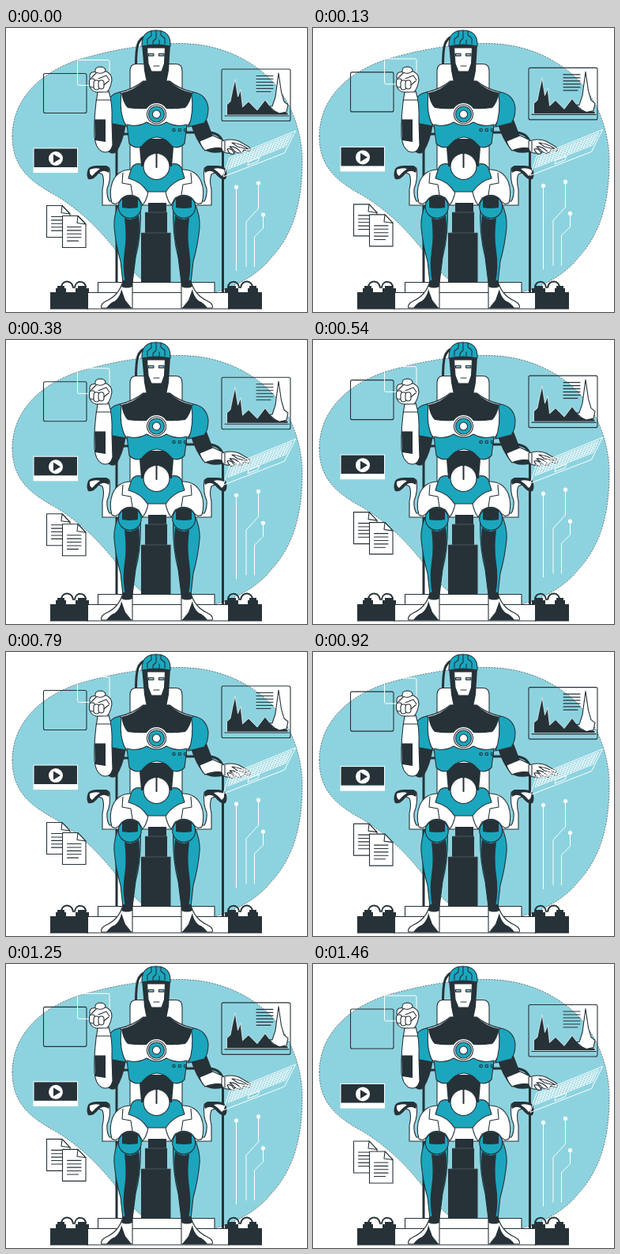
These frames come from a looping animation (381x359 px, 1500 ms). An HTML page:

```html
<!DOCTYPE html>
<html lang="en">
<head>
<meta charset="utf-8">
<title>Robot at work</title>
<style>
html,body{margin:0;width:100%;height:100%;overflow:hidden;background:#fff}
svg{display:block;width:381px;height:359px}
.d{fill:#263238}
.t{fill:#1ba6be}
.w{fill:#fff}
.o{stroke:#263238;stroke-width:1.1;stroke-linejoin:round;stroke-linecap:round}
.l{fill:none;stroke:#263238;stroke-width:1.1;stroke-linecap:round;stroke-linejoin:round}
.r{fill:none;stroke:#263238;stroke-width:3}
.h{fill:none;stroke:#fff;stroke-width:1}
</style>
</head>
<body>
<svg viewBox="0 0 381 359">
  <path fill="#8dd3df" stroke="#263238" stroke-width=".6" stroke-dasharray="2 1.5" d="M8 137C8 94 38 58 92 40C136 27 180 19.500 222 19.500C262 20 297 33 325 56C358 83 375 128 375 168C375 215 366 258 336 290C318 313 290 327 264 334H200C170 324 152 298 136 277C112 248 90 228 62 211C26 192 8 172 8 137Z"/>

  <g class="bob">
    <rect class="l" x="47.500" y="57.500" width="54.500" height="50" rx="2"/>
    <rect class="h" x="90.500" y="40.500" width="40.500" height="32" rx="2"/>
    <rect class="w" x="34.500" y="151.500" width="56.500" height="31.500"/>
    <rect class="d" x="35.500" y="152.500" width="54.500" height="23.500"/>
    <circle class="w" cx="63" cy="165" r="9"/>
    <path class="d" d="M60 159.500L69 165L60 170.500Z"/>
    <g id="docs"></g>
    <g id="chart">
      <rect class="l" x="273" y="52" width="87" height="65.500" rx="2"/>
      <path id="text" class="l"/>
      <path class="d" stroke="#fff" stroke-width=".7" d="M279.500 110V97L284 93L287 78L290 65L293.500 87L297 78L299.500 100L307 93L318 104L328 91L338 104L357 107V110Z"/>
      <path class="w o" stroke-width=".8" d="M333 99L337 99L341 87L345 57L348.500 81L352 93L357 97L355 106L346 108L340 105Z"/>
      <path class="l" d="M277 111H358"/>
    </g>
    <path class="h" d="M291.500 201V307M319.500 196V228L304 245V302M325.500 236V253L314.500 264V302"/>
    <g class="w"><circle cx="291.500" cy="201" r="2.600"/><circle cx="319.500" cy="196" r="2.600"/><circle cx="325.500" cy="236" r="2.600"/></g>
  </g>

  <!-- chair -->
  <path class="r" d="M176 11C167 14 164.500 22 164.500 48"/>
  <path class="w o" d="M157 224V54Q157 45.500 165 45.500H215Q223 45.500 223 54V224Z"/>
  <path class="r" d="M160 134H150Q140 135 140 147V334M222 132H258Q274.500 134 274.500 149V334"/>
  <path class="d" d="M180 221H203V233H204V259H208.500V322H171V259H176V233H180Z"/>
  <path class="l" style="stroke:#54666e;stroke-width:.7" d="M177 233H204M172 259H208"/>
  <rect class="w o" x="116.500" y="321.500" width="147.500" height="13"/>
  <rect class="w o" x="103" y="334.500" width="179" height="20.500"/>
  <path class="d" d="M56 334H104V355.500H56ZM281 334H324V355.500H281Z"/>
  <g id="half">
    <path class="d" d="M63 334V329H76V334ZM88 334V329H105V334ZM65 329V326H74V329ZM91 329V326H101V329Z"/>
    <path class="l" style="stroke-width:2" d="M70 328C70 319 83 317 85 328M87 328C88 318 101 319 101 328"/>
    <!-- armrest -->
    <path class="w o" d="M106 189Q115 180 122 185Q125 192 122 204V224H158V219H131Q127 212 128 203Q133 192 131 177Q120 174 106 189Z"/>
    <path class="d" d="M104 191Q101 185 104 178Q107 174 116 174L127 174Q133 176 130 183Q123 178 117 184Q110 193 104 191Z"/>
    <path class="w" d="M106 179Q113 176 119 178Q113 182 109 187Q105 184 106 179Z"/>
    <!-- leg -->
    <path class="t o" d="M143 222Q136 237 137 252Q139 274 145 295L148 322H160L164 290Q172 260 170 222Z"/>
    <path class="d" d="M150 240Q159 245 168 237Q171 258 165 282L160 322H151Q147 302 150 282Q153 262 150 240Z"/>
    <path class="w o" d="M160 179Q142 178 135 194Q130 207 134 221Q141 225 146 216Q156 207 168 215L173 224Q181 214 181 194Z"/>
    <path class="l" d="M148 183L147 196L158 198L160 211"/>
    <circle class="t o" cx="156.800" cy="226" r="14.500"/>
    <path class="d" d="M147 215Q157 209 167 215V227Q157 229 147 227Z"/>
    <!-- foot -->
    <path class="w o" d="M148 320H160V354H121Q119 349 127 345Q143 338 148 320Z"/>
    <path class="d" d="M148 319H160V327Q153 330 146 327ZM146 330L151 344L159 354H127Q132 347 138 345Q145 339 146 330Z"/>
  </g>

  <!-- torso -->
  <path class="t o" d="M158 180Q160 170 172 172H209Q221 170 223 180L226 190Q212 193 202 207H179Q171 194 155 190Z"/>
  <path class="d" d="M175 140H206L212 151L210 175H171L169 151Z"/>
  <path class="w o" d="M144 81Q160 78 174 67H207Q221 78 237 81L238 112L229 125H153L143 112Z"/>
  <path class="t o" d="M153 122Q166 126 178 119Q191 127 203 119Q216 126 229 122L226 146Q219 153 211 150Q201 138 191 138Q181 138 171 150Q163 153 156 146Z"/>
  <path class="d" d="M146 82Q162 79 174 67H207Q219 79 236 82Q233 95 227 101Q213 103 203 102Q198 95 190.500 95Q183 95 178 102Q166 103 154 101Q148 95 146 82Z"/>
  <circle class="w o" cx="190.500" cy="109" r="12"/>
  <circle class="t o" cx="190.500" cy="109" r="10"/>
  <circle class="w o" cx="190.500" cy="109" r="5"/>
  <g class="l"><circle cx="212.500" cy="129" r="1.700"/><circle cx="219.800" cy="129" r="1.700"/><circle cx="227" cy="129" r="1.700"/></g>
  <circle class="w o" cx="190.500" cy="175" r="16.500"/>
  <path class="l" style="stroke-width:2" d="M190.500 158V176"/>

  <!-- raised arm -->
  <path class="d" d="M133 116L152 121Q149 142 140 157Q132 162 126 152Z"/>
  <path class="t o" d="M144 81Q129 84 127 100Q127 114 135 121L152 124Q143 108 146 83Z"/>
  <path class="w o" d="M116 81L130 80Q135 94 134 118L135 148Q132 160 121 156Q113 151 112 137Q111 109 116 81Z"/>
  <path class="d" d="M112 115.500H126V144L113 142Z"/>
  <path class="l" d="M114 91H132"/>
  <g class="w o">
    <path d="M107 66Q104 58 109 56L115 55L127 55Q134 58 134 66Q132 77 128 81H114Q107 79 106 73Z"/>
    <path d="M113 56Q112 50 118 49Q126 49 126 54Q123 58 117 57Z"/>
    <rect x="105.500" y="64" width="7" height="11" rx="3.500"/><rect x="111" y="66" width="7" height="12" rx="3.500"/><rect x="117" y="66" width="7" height="11" rx="3.500"/>
    <path d="M108 63L114 57M117 64L127 60L131 66M124 72L130 67"/>
  </g>

  <!-- resting arm -->
  <path class="d" d="M234 122L254 116L262 137L274 143V157Q257 160 249 152Q240 141 234 122Z"/>
  <path class="t o" d="M237 81Q254 84 256 101Q256 114 251 120L231 125Q238 108 235 83Z"/>
  <path class="w o" d="M245 143L262 136L275 142V152Q262 150 252 155Q247 150 245 143Z"/>
  <g class="w o">
    <path d="M273 143Q285 139 295 143L307 150Q311 153 308 156L301 154Q299 160 294 158L290 155Q288 162 283 158Q274 159 273 152Z"/>
    <path d="M286 145Q297 146 307 153Q300 152 293 150ZM283 150Q291 149 298 158Q292 159 288 154ZM280 153Q286 151 289 159Q283 161 280 153Z"/>
    <path d="M277 143V156"/>
  </g>

  <g class="bob">
    <path class="h" d="M283 164L366.500 130L352.500 158L275 188Z"/>
    <path id="keys" class="h" style="stroke-width:.9"/>
    <path class="h" d="M307 169L321 163.500L319 168.500L306 173.500Z"/>
  </g>

  <!-- head -->
  <path class="d" d="M172 20H208L206 54L203 69H178L175 54Z"/>
  <path class="w o" d="M178.500 25H201.500L200.500 45L197 55H184L180 45Z"/>
  <path class="t o" d="M172 23Q171 3 190 3Q209 3 208 23Q190 19 172 23Z"/>
  <path class="l" d="M184 4V10L179 14V20M190 3V13L186 17V21M196 4V9L201 13V20M194 21V15"/>
  <g fill="#8dd3df" class="o"><rect x="180.500" y="32.500" width="6.500" height="2.600"/><rect x="193.500" y="32.500" width="6.500" height="2.600"/></g>
  <path class="l" d="M187 48H194"/>
</svg>
<script>
const $ = id => document.getElementById(id);
const rows = (n, f) => Array.from({length: n}, (_, i) => f(i)).join("");

// page with folded corner and text lines
const page = (x, y) => `<g transform="translate(${x} ${y})">
  <path class="w o" d="M0 0H19.500L29.500 10.500V40H0Z"/>
  <path class="w o" d="M19.500 0L18.500 9L29.500 10.500Z"/>
  <path class="l" d="${rows(5, i => `M6 ${14 + i * 4.4}h${i == 4 ? 14 : 17.5}`)}"/></g>`;
$("docs").innerHTML = page(51.5, 224.5) + page(71.5, 237.5);

$("text").setAttribute("d", rows(6, i => `M317 ${60.5 + i * 4}h${i == 5 ? 18 : 21}`));

// keyboard point: u along, v down the sloping board
const at = (u, v) => {
  const x = 283 + 83.5 * u - (8 + 6 * u) * v;
  const y = 164 - 34 * u + (24 + 4 * u) * v;
  return x.toFixed(1) + " " + y.toFixed(1);
};
const line = (a, b, c, d) => `M${at(a, b)}L${at(c, d)}`;
$("keys").setAttribute("d",
  rows(6, i => line(.04, .1 + i * .11, .96, .1 + i * .11)) +
  rows(19, i => line(.04 + i * .0511, .1, .04 + i * .0511, .65)));

const half = $("half"), twin = half.cloneNode(true);
twin.removeAttribute("id");
twin.setAttribute("transform", "translate(382 0) scale(-1 1)");
half.after(twin);

// linear rise and fall, shown at 24 steps a second
const LOOP = 1500, STEPS = 36, RISE = 9.5;
const floats = document.querySelectorAll(".bob");
function draw(ms) {
  const step = Math.floor((ms + 4) * STEPS / LOOP) % STEPS;
  const y = RISE * (Math.abs(2 * step / STEPS - 1) - 1);
  floats.forEach(g => g.setAttribute("transform", `translate(0 ${y.toFixed(2)})`));
}
const start = performance.now();
function tick() {
  draw(performance.now() - start);
  requestAnimationFrame(tick);
}
draw(0);
requestAnimationFrame(tick);
</script>
</body>
</html>
```
